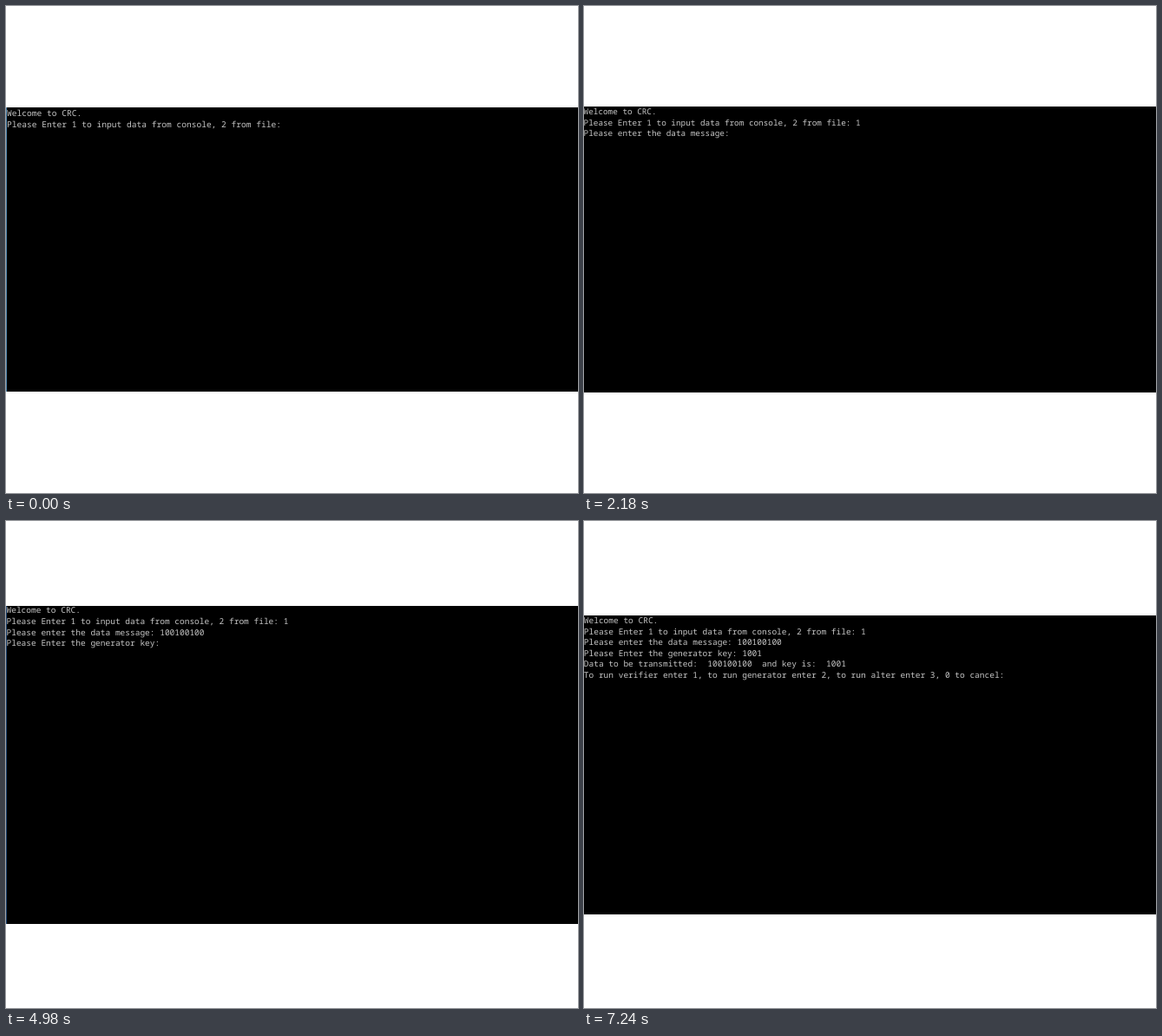
Write an HTML page that moves like this. It is 659 px wide and 562 px high and loops after 8 s.

```html
<!DOCTYPE html>
<html lang="en">
<head>
<meta charset="utf-8">
<title>CRC console</title>
<style>
  html, body { margin: 0; width: 100%; height: 100%; overflow: hidden; background: #fff; }
  svg { display: block; width: 659px; height: 562px; }
  text {
    font-family: "Noto Sans Mono", "DejaVu Sans Mono", monospace;
    fill: #c6c6c6;
    white-space: pre;
    text-rendering: geometricPrecision;
  }
</style>
</head>
<body>
<svg id="stage" viewBox="0 0 659 562"></svg>
<script>
const LOOP = 8000;
const WIDTH = 659;
const stage = document.getElementById("stage");

const hello = "Welcome to CRC.";
const source = "Please Enter 1 to input data from console, 2 from file:";
const message = "Please enter the data message:";
const key = "Please Enter the generator key:";

// Console box, left edge colour, text origin, character and line pitch
const screens = [
  { at: 0, top: 117, bottom: 445, edge: "#4f86b0", x: 1, y: 127.4, pitch: 5.75, leading: 12.6,
    lines: [hello, source] },
  { at: 500, top: 116, bottom: 446, x: -0.4, y: 125.3, pitch: 5.6, leading: 12.4,
    lines: [hello, source + " 1", message] },
  { at: 3300, top: 98, bottom: 465, edge: "#1f4470", x: 0.5, y: 106.4, pitch: 5.7, leading: 12.6,
    lines: [hello, source + " 1", message + " 100100100", key] },
  { at: 6100, top: 109, bottom: 454, x: -0.2, y: 118, pitch: 5.7, leading: 12.6,
    lines: [hello, source + " 1", message + " 100100100", key + " 1001",
      "Data to be transmitted:  100100100  and key is:  1001",
      "To run verifier enter 1, to run generator enter 2, to run alter enter 3, 0 to cancel:"] }
];

function add(parent, tag, attrs, content = "") {
  const el = document.createElementNS("http://www.w3.org/2000/svg", tag);
  for (const name in attrs) el.setAttribute(name, attrs[name]);
  el.textContent = content;
  return parent.appendChild(el);
}

function build(s) {
  const group = add(stage, "g", {});
  const height = s.bottom - s.top;
  add(group, "rect", { x: 0, y: s.top, width: WIDTH, height, fill: "#000" });
  if (s.edge) add(group, "rect", { x: 0, y: s.top, width: 1, height, fill: s.edge });
  s.lines.forEach((line, i) => add(group, "text", {
    x: s.x, y: s.y + i * s.leading, "font-size": s.pitch / 0.6
  }, line));
  return group;
}

const groups = screens.map(build);

function draw(now) {
  const t = now % LOOP;
  const current = screens.filter(s => s.at <= t).length - 1;
  groups.forEach((g, i) => g.setAttribute("visibility", i === current ? "visible" : "hidden"));
}

function tick() {
  draw(performance.now());
  requestAnimationFrame(tick);
}
tick();
</script>
</body>
</html>
```
